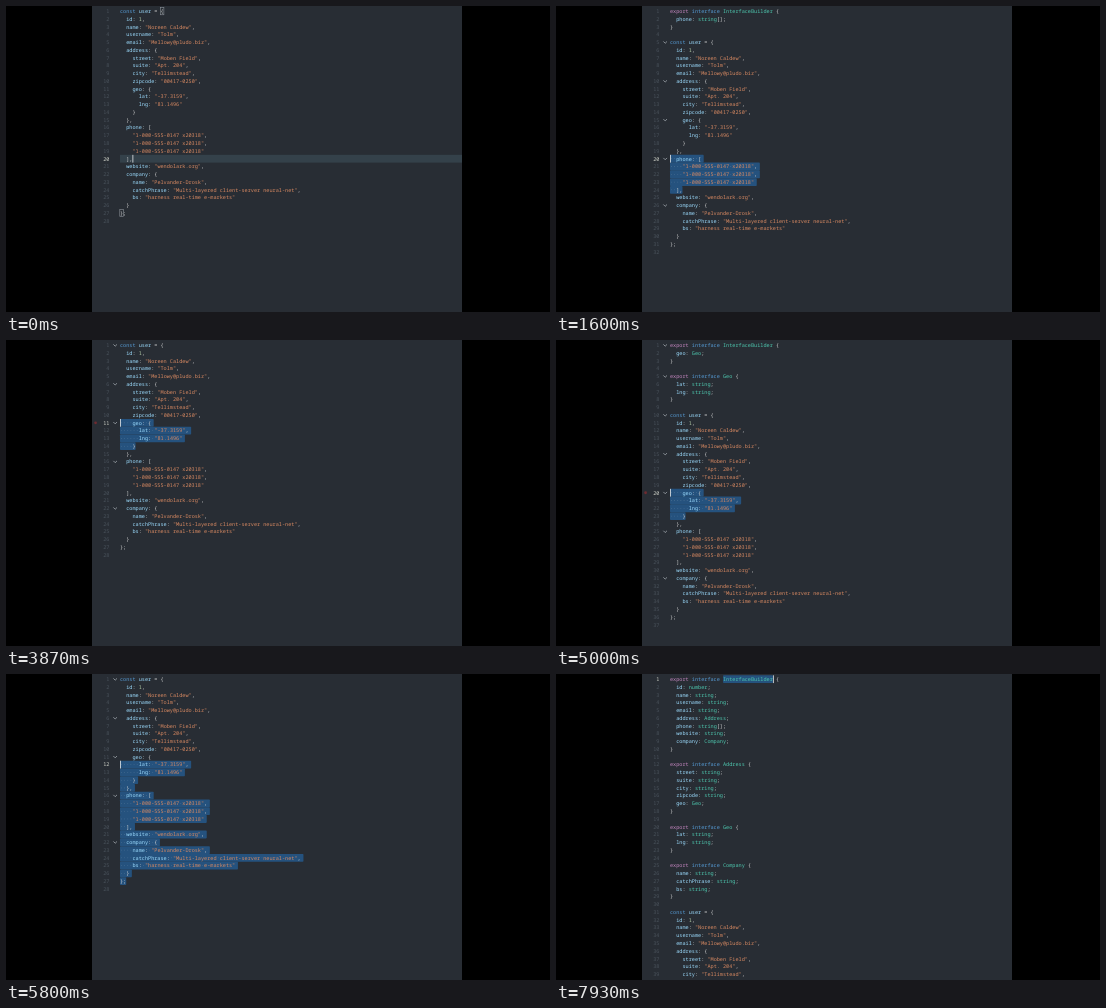
Write an HTML page that moves like this. It is 544 px wide and 306 px high and loops after 8000 ms.

```html
<!DOCTYPE html>
<html lang="en">
<head>
<meta charset="utf-8">
<title>Interface generator</title>
<style>
  html, body { margin: 0; width: 100%; height: 100%; overflow: hidden; background: #000; }
  svg { display: block; width: 100vw; height: 100vh; }
  text {
    font: 5.2px "Noto Sans Mono", "DejaVu Sans Mono", monospace;
    white-space: pre;
    text-rendering: geometricPrecision;
  }
</style>
</head>
<body>
<svg viewBox="0 0 544 306">
  <rect width="544" height="306" fill="#000"/>
  <rect x="86" width="370" height="306" fill="#282d34"/>
  <g id="under"></g>
  <g id="numbers"></g>
  <g id="types"></g>
  <g id="user"></g>
  <g id="over"></g>
</svg>
<script>
const LOOP = 8000, LEFT = 114, TOP = 1.3, ROW = 7.765, CHAR = 3.12;
const $ = id => document.getElementById(id);

const userLines = `const user = {
  id: 1,
  name: "Noreen Caldew",
  username: "Tolm",
  email: "Mellowy@pludo.biz",
  address: {
    street: "Moben Field",
    suite: "Apt. 204",
    city: "Tellimstead",
    zipcode: "00417-0250",
    geo: {
      lat: "-37.3159",
      lng: "81.1496"
    }
  },
  phone: [
    "1-000-555-0147 x20318",
    "1-000-555-0147 x20318",
    "1-000-555-0147 x20318"
  ],
  website: "wendolark.org",
  company: {
    name: "Pelvander-Drosk",
    catchPhrase: "Multi-layered client-server neural-net",
    bs: "harness real-time e-markets"
  }
};
`.split("\n");

// "a b:T" lists fields; the type defaults to string
const block = (name, fields) => [
  `export interface ${name} {`,
  ...fields.split(" ").map(f => {
    const [key, type = "string"] = f.split(":");
    return `  ${key}: ${type};`;
  }),
  "}", ""
];
const geo = block("Geo", "lat lng");
const docs = {
  none: [],
  phone: block("InterfaceBuilder", "phone:string[]"),
  geo: [...block("InterfaceBuilder", "geo:Geo"), ...geo],
  all: [
    ...block("InterfaceBuilder", "id:number name username email address:Address phone:string[] website company:Company"),
    ...block("Address", "street suite city zipcode geo:Geo"),
    ...geo,
    ...block("Company", "name catchPhrase bs")
  ]
};

const rules = [
  [/^"/, "#d98a62"],
  [/^export$/, "#c586c0"],
  [/^(interface|const)$/, "#569cd6"],
  [/^(string|number|[A-Z]\w*)$/, "#4ec9b0"],
  [/^\d/, "#b5cea8"],
  [/^[a-z]/, "#9cdcfe"],
  [/./, "#d4d4d4"]
];
const colour = token => rules.find(([re]) => re.test(token))[1];
const indent = line => line.length - line.trimStart().length;
const rowY = n => TOP + (n - 1) * ROW;
const colX = c => LEFT + c * CHAR;

function textLine(line, i) {
  const tokens = line.trim().match(/"[^"]*"|\w+|\s+|[^\w\s"]+/g) || [];
  const spans = tokens.map(k => `<tspan fill="${colour(k)}">${k}</tspan>`).join("");
  return `<text x="${colX(indent(line))}" y="${rowY(i + 1) + 5.7}">${spans}</text>`;
}

const rect = (x, y, w, h, attrs) => `<rect x="${x}" y="${y}" width="${w}" height="${h}" ${attrs}/>`;
const box = ([n, c]) => rect(colX(c) - .2, rowY(n) + .3, CHAR + .4, ROW - .6, 'fill="none" stroke="#8b9198" stroke-width=".6"');
const chevron = n => `<path d="M107.4 ${rowY(n) + 3.1}l1.8 1.8l1.8 -1.8" fill="none" stroke="#b4bac0" stroke-width=".7"/>`;

function selected(lines, from, to) {
  let out = "";
  for (let n = from[0]; n <= to[0]; n++) {
    const line = lines[n - 1];
    const start = n === from[0] ? from[1] : 0;
    const last = n === to[0];
    const end = last ? to[1] : line.length;
    const width = (end - start + (last ? 0 : .8)) * CHAR;
    out += rect(colX(start), rowY(n), width, ROW + .05, 'rx=".8" fill="#25527e"');
    for (let c = start; c < end; c++) {
      if (line[c] === " ")
        out += `<circle cx="${colX(c + .5)}" cy="${rowY(n) + 3.9}" r=".38" fill="#8fa9bf" opacity=".55"/>`;
    }
  }
  return out;
}

const ramp = (t, a, b) => Math.min(1, Math.max(0, (t - a) / (b - a)));
const within = (t, a, b) => t >= a && t < b;
const drag = (t, a, b, from, to) => Math.round(from + (to - from) * ramp(t, a, b));

function docAt(t) {
  if (within(t, 1600, 2470)) return "phone";
  if (within(t, 4000, 5067)) return "geo";
  return t >= 6730 ? "all" : "none";
}

// Anchor and head as [line, column]; lines count from the top of the user object
function rangeAt(t) {
  if (t < 670) return { anchor: [20, 4], head: [20, 4], boxes: [[1, 13], [27, 0]] };
  if (t < 3130) return { anchor: [20, 4], head: [drag(t, 610, 930, 20, 16), 0] };
  if (t < 3330) return { anchor: [14, 5], head: [14, 5], boxes: [[11, 9], [14, 4]] };
  if (t < 5267) return { anchor: [14, 5], head: [drag(t, 3330, 3600, 14, 11), 0] };
  if (t < 5400) return { anchor: [27, 2], head: [27, 2] };
  if (t < 5870) return { anchor: [27, 2], head: [drag(t, 5400, 5800, 27, 12), 0] };
  if (t < 7670) return { anchor: [27, 2], head: [drag(t, 5800, 6400, 12, 1), 0] };
  return { anchor: [-29, t < 7730 ? 33 : 17], head: [-29, 33] };
}

const blinks = [[1130, 1330], [2070, 2330], [4530, 4730], [7400, 7670]];

$("user").innerHTML = userLines.map(textLine).join("");
$("types").innerHTML = Object.entries(docs)
  .map(([key, lines]) => `<g data-doc="${key}">${lines.map(textLine).join("")}</g>`).join("");
$("numbers").innerHTML = Array.from({ length: 39 }, (_, i) =>
  `<text x="103.4" y="${rowY(i + 1) + 5.7}" text-anchor="end">${i + 1}</text>`).join("");

function draw(t) {
  const doc = docAt(t), types = docs[doc], shift = types.length;
  const lines = [...types, ...userLines];
  const { anchor, head, boxes = [] } = rangeAt(t);
  const move = ([n, c]) => [n + shift, c];
  const a = move(anchor), h = move(head);
  const order = a[0] < h[0] || (a[0] === h[0] && a[1] < h[1]) ? [a, h] : [h, a];
  const empty = a[0] === h[0] && a[1] === h[1];

  $("under").innerHTML = empty
    ? rect(LEFT, rowY(h[0]), 456 - LEFT, ROW, 'fill="#34414a"')
    : selected(lines, ...order);

  $("user").setAttribute("transform", `translate(0 ${shift * ROW})`);
  for (const g of $("types").children)
    g.setAttribute("display", g.dataset.doc === doc ? "inline" : "none");
  [...$("numbers").children].forEach((el, i) => {
    el.setAttribute("fill", i + 1 === h[0] ? "#d3d6cc" : "#4a535c");
    el.setAttribute("display", i < lines.length ? "inline" : "none");
  });

  // Folding for fresh blocks shows up a moment after the insertion
  const folds = lines.flatMap((line, i) =>
    /[{[]$/.test(line) && !(doc === "phone" && i < shift && t < 1870) ? [i + 1] : []);
  const foldAlpha = ramp(t, 70, 400) * (1 - ramp(t, 5870, 6400));
  let over = `<g opacity="${foldAlpha}">${folds.map(chevron).join("")}</g>`;
  over += boxes.map(b => box(move(b))).join("");
  if (within(t, 3600, 5267))
    over += `<circle cx="89.6" cy="${rowY(11 + shift) + 3.9}" r="1.4" fill="#6e2b30"/>`;
  if (!blinks.some(([from, to]) => within(t, from, to)))
    over += rect(colX(h[1]), rowY(h[0]), .8, ROW, 'fill="#e4e6e8"');
  $("over").innerHTML = over;
}

function tick() {
  draw(performance.now() % LOOP);
  requestAnimationFrame(tick);
}
tick();
</script>
</body>
</html>
```
